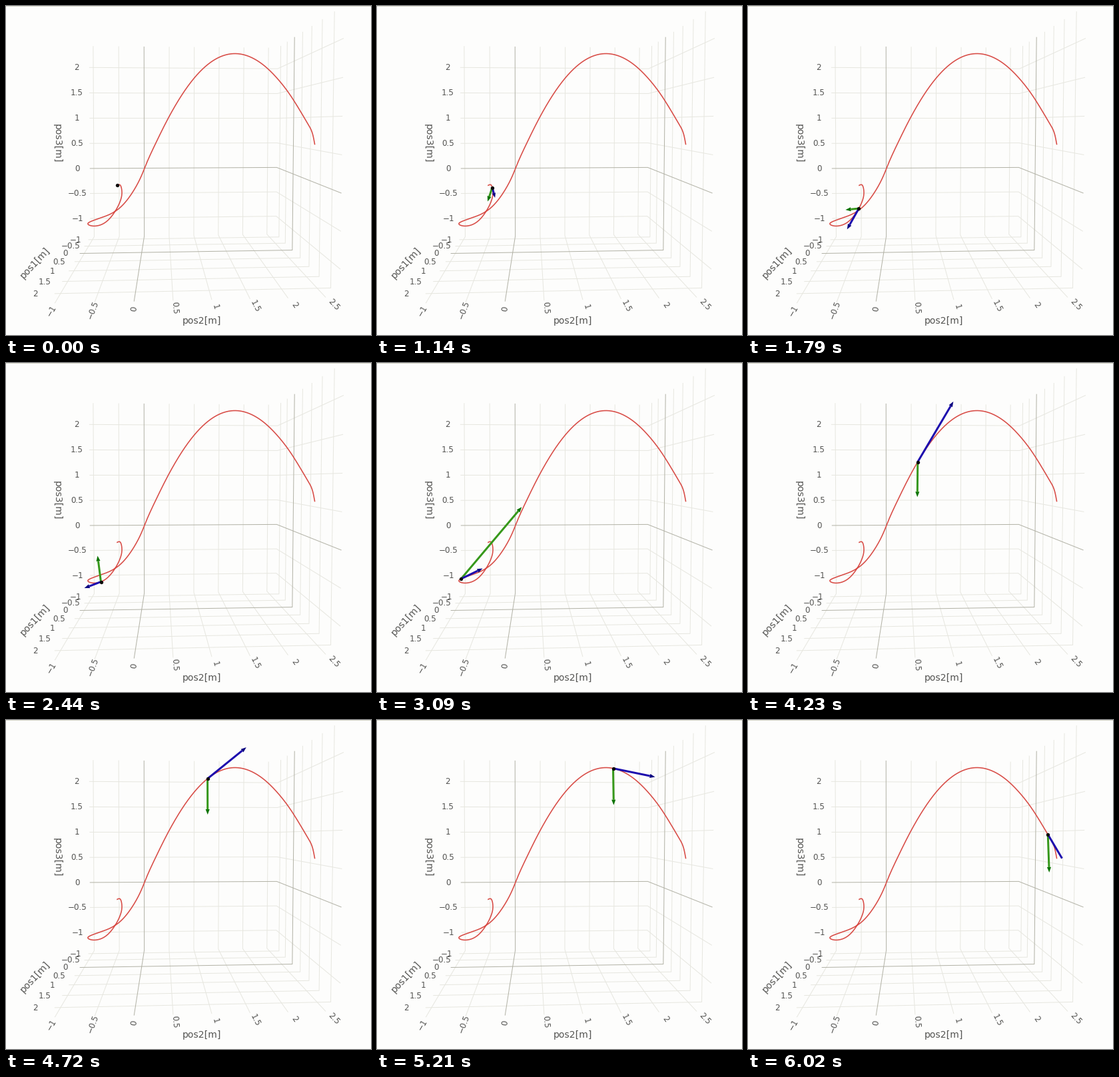
A matplotlib script that plays this animation: 548 px wide and 494 px high, repeating every 6.18 s.

```python
import numpy as np
import matplotlib.pyplot as plt
from matplotlib.animation import FuncAnimation
from matplotlib.collections import LineCollection

W, H, DPI = 548, 494, 100
STEPS, LOOP_MS = 38, 6180
PX = 72 / DPI  # points per pixel

PAPER, GRID, ZERO, INK = "#fdfdfc", "#e7e7e0", "#b2b2a6", "#545452"
CURVE, BLACK = "#d84c46", "#0a0a0a"

# scene box in metres, and the stage limits where arrows are cut off
P1_MIN, P1_MAX = -1.245, 2.35
P2_MIN, P2_MAX = -1.08, 2.69
P3_MIN, P3_MAX = -1.37, 2.42
X_MIN, X_MAX = 114.5, 471

# step, x, y of the swing before the throw
SWING = [(0, 166.5, 268.8), (4, 169, 267.8), (7, 172.6, 272),
         (9, 173, 285.5), (12, 160.5, 312), (15, 142, 328),
         (17, 127.5, 329.5), (18.5, 122.8, 325.5), (20, 142, 317.5),
         (21, 171, 302), (22, 197, 266.5)]
LANDING = [(38, 459, 189), (39, 463, 207)]

# step, dx, dy: the swing turns, then only gravity is left
ACCEL = np.array([(0, 0, 2), (7, -7, 21), (11, -20, 2), (15, -5, -39),
                  (20, 115, -125), (22, -90, 9), (24, -1, 52), (37, 2, 57)])


def project(p1, p2, p3):
    """One-point perspective with a slight turn of the camera."""
    depth = 0.873 - 0.102 * p1 + 0.006 * p2 - 0.004 * p3
    return 234 + (75 * p2 - 27) / depth, 173.5 + (69.5 - 75 * p3) / depth


def flight(step):
    """Ballistic arc as seen on the stage."""
    t, u = step - 32, step - 31.4
    x = 354 + 18 * t + 0.23 * t**2
    y = 71 + u**2 * (3.03 + 0.0517 * u - 0.00377 * u**2)
    return step, x, y


def spline(knots, t):
    """Natural cubic spline through rows of (time, x, y)."""
    k, p = knots[:, 0], knots[:, 1:]
    n, h = len(k), np.diff(k)[:, None]
    m, rhs = np.eye(n), np.zeros_like(p)
    for i in range(1, n - 1):
        a, b = h[i - 1, 0], h[i, 0]
        m[i, i - 1:i + 2] = a, 2 * (a + b), b
        rhs[i] = 6 * ((p[i + 1] - p[i]) / b - (p[i] - p[i - 1]) / a)
    bend = np.linalg.solve(m, rhs)
    i = np.clip(np.searchsorted(k, t, side="right") - 1, 0, n - 2)
    b = (t - k[i])[:, None] / h[i]
    a = 1 - b
    return (a * p[i] + b * p[i + 1]
            + ((a**3 - a) * bend[i] + (b**3 - b) * bend[i + 1]) * h[i]**2 / 6)


PER_STEP = 20
knots = np.array(SWING + [flight(k) for k in range(23, 38)] + LANDING)
times = np.linspace(0, 39, 39 * PER_STEP + 1)
path = spline(knots, times)
speed = np.gradient(path, times, axis=0)


def velocity(step):
    boost = 1.3 * np.exp(-(step - 22) ** 2 / 3)  # strongest at the release
    return speed[step * PER_STEP] * (3.5 + boost)


def acceleration(step):
    k, dx, dy = ACCEL.T
    return np.array([np.interp(step, k, dx), np.interp(step, k, dy)])


fig = plt.figure(figsize=(W / DPI, H / DPI), dpi=DPI, facecolor=PAPER)
ax = fig.add_axes([0, 0, 1, 1])
ax.set_xlim(-0.5, W - 0.5)
ax.set_ylim(H - 0.5, -0.5)
ax.axis("off")


def label(x, y, text, size=12, angle=0):
    ax.text(x, y, text, fontsize=size * PX, rotation=angle, color=INK,
            family="DejaVu Sans", ha="center", va="center")


def tick(value):
    return f"{value:g}".replace("-", "\u2212")


light, dark = [], []


def grid_line(value, *points):
    (dark if value == 0 else light).append([project(*p) for p in points])


for v in np.arange(-1, 2.6, 0.5):
    # back wall, then floor
    grid_line(v, (P1_MIN, v, P3_MAX), (P1_MIN, v, P3_MIN),
              (P1_MAX, v, P3_MIN))
    x0, y0 = project(P1_MIN, v, P3_MIN)
    x, y = project(2.6, v, P3_MIN)
    slope = np.degrees(np.arctan((y - y0) / (x0 - x)))
    label(x + 2, y, tick(v), 12, slope)
    if v > 2:
        continue
    # floor, then right wall
    grid_line(v, (v, P2_MIN, P3_MIN), (v, P2_MAX, P3_MIN),
              (v, P2_MAX, P3_MAX))
    label(*project(v, -1.33, P3_MIN), tick(v))
    # back wall, then right wall
    grid_line(v, (P1_MIN, P2_MIN, v), (P1_MIN, P2_MAX, v),
              (P1_MAX, P2_MAX, v))
    label(*project(P1_MIN, -1.33, v), tick(v))

ax.add_collection(LineCollection(light, colors=GRID, linewidths=PX))
ax.add_collection(LineCollection(dark, colors=ZERO, linewidths=PX))
for y, color in ((0, "#d8d8cc"), (H - 1, ZERO)):
    ax.plot([-1, W], [y, y], color=color, lw=PX)

label(43, 385, "pos1[m]", 14, 47)
label(293, 472, "pos2[m]", 14)
label(76, 206, "pos3[m]", 14, -90)

ax.plot(*path.T, color=CURVE, lw=1.6 * PX, zorder=3)


class Arrow:
    def __init__(self, vector, shaft, tip, z):
        self.vector = vector
        self.line, = ax.plot([], [], color=shaft, lw=3 * PX, zorder=z,
                             solid_capstyle="butt")
        self.head, = ax.fill([0, 0, 0], [0, 0, 0], color=tip, lw=0, zorder=z)

    def update(self, step, base):
        v = self.vector(step)
        end = base + v
        clipped = not X_MIN <= end[0] <= X_MAX
        if clipped:
            edge = np.clip(end[0], X_MIN, X_MAX)
            end = base + v * (edge - base[0]) / v[0]
        size = np.hypot(*(end - base))
        along = (end - base) / max(size, 1e-6)
        side = np.array([-along[1], along[0]])
        length = 0 if clipped else min(8, 0.45 * size)
        neck = end - along * length
        half = 0.38 * length
        self.line.set_data(*np.array([base, neck]).T)
        self.head.set_xy([end, neck + side * half, neck - side * half])


arrows = [Arrow(acceleration, "#36981a", "#0b7400", 4),
          Arrow(velocity, "#1c0cae", "#0c0680", 5)]
dot, = ax.plot([], [], "o", color=BLACK, ms=5.4 * PX, mew=0, zorder=6)


def update(step):
    base = path[step * PER_STEP]
    dot.set_data([base[0]], [base[1]])
    for arrow in arrows:
        arrow.update(step, base)
    return [dot] + [part for a in arrows for part in (a.line, a.head)]


anim = FuncAnimation(fig, update, frames=STEPS, interval=LOOP_MS / STEPS,
                     repeat=True, repeat_delay=0, blit=False)
plt.show()
```
